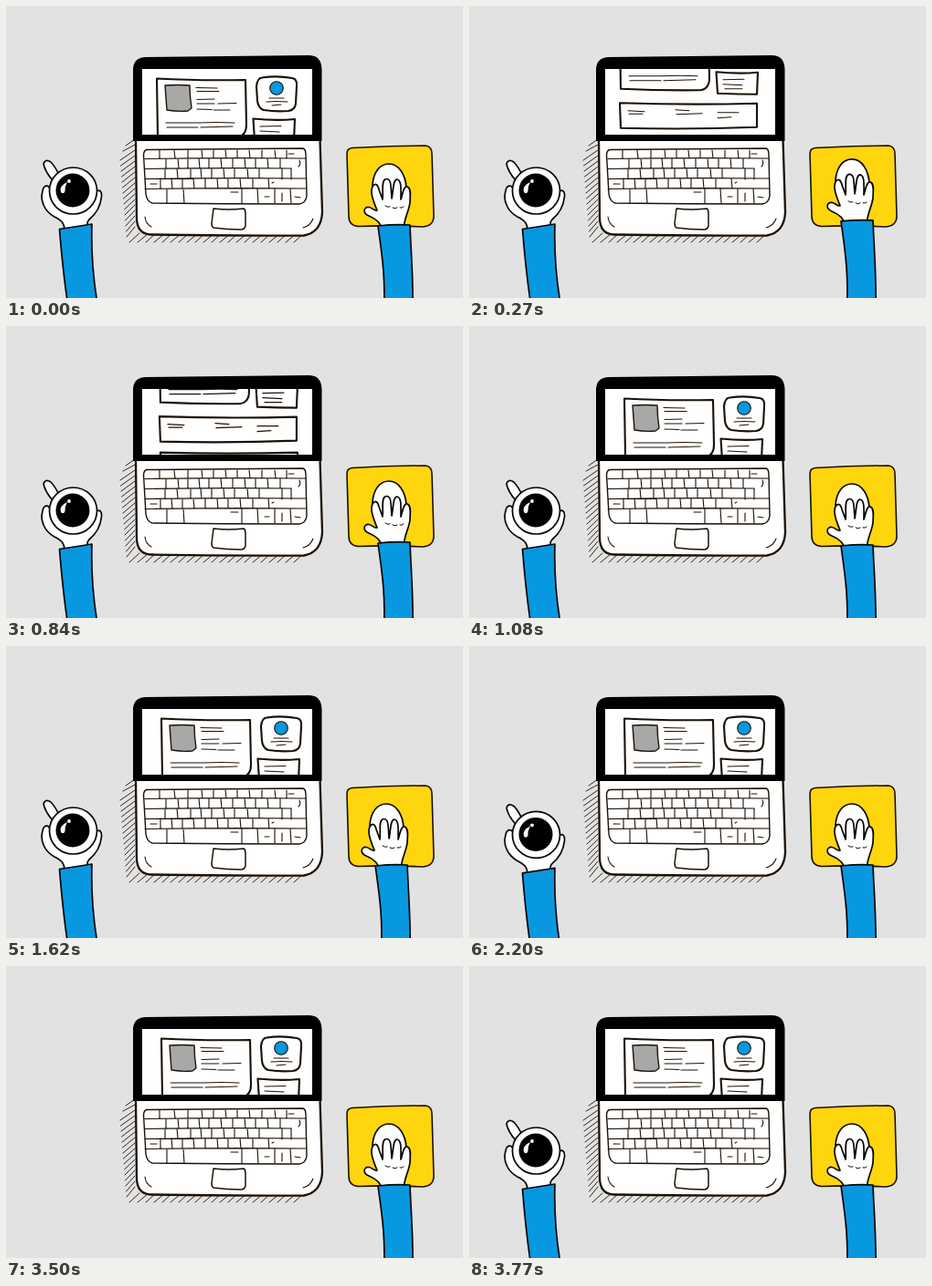
Recreate the animation shown at these times as an HTML page. Size 500 px wide and 320 px high, loop 4770 ms.

```html
<!DOCTYPE html>
<html lang="en">
<head>
<meta charset="utf-8">
<title>Desk</title>
<style>
  html, body { margin: 0; width: 100%; height: 100%; overflow: hidden; background: #e2e2e2; }
  svg { display: block; }
  .ink { fill: none; stroke: #1c1005; stroke-linecap: round; stroke-linejoin: round; }
  .arm { fill: #fff; stroke: #050505; stroke-width: 1.7; stroke-linecap: round; stroke-linejoin: round; }
  .blue { fill: #0898e0; }
  .gray { fill: #a8a8a8; }
  .white { fill: #fff; }
</style>
</head>
<body>
<svg width="500" height="320" viewBox="0 0 500 320">
  <clipPath id="view"><rect x="149" y="69" width="186" height="73"/></clipPath>

  <!-- laptop -->
  <path id="hatch" class="ink" stroke-width=".9"/>
  <path class="ink white" stroke-width="2.3" d="M142 146L143 232Q143 250 159 250.500Q240 252 326 251.500Q345 248 346 226L343.500 146Z"/>
  <path d="M139 148V70Q139 57 152 56L331 54Q345 54 345.500 69V148Z"/>
  <rect class="white" x="149" y="69" width="186" height="72"/>
  <g clip-path="url(#view)">
    <g id="page" class="ink" stroke-width="1.1">
      <g stroke-width="2.1">
        <path d="M165 79.500Q210 82 262 81L263 130Q263 143 252 143.500Q210 144 166 142Z"/>
        <path d="M280 78.500Q297 76 313 79Q319 80 318 88L317 107Q316 114 309 115Q295 116 282 114Q276 112 275 104L274 88Q275 79 280 78.500Z"/>
        <path d="M270.500 123.500Q295 126 316 124L315 148Q295 148 272 147Z"/>
        <path d="M165 157.500Q240 160 315 158V184Q240 187 166 185Z"/>
        <path d="M166 197Q240 199 316 197L317 240Q316 249 308 249Q240 247 174 248Q166 247 166 240Z"/>
        <path d="M167 258Q240 261 317 258.500L316 310H168ZM180 275.5Q245 274 316 275"/>
      </g>
      <path class="gray" stroke-width="1.4" d="M174 87Q188 86 201 87Q201 99 203 112L199 115Q188 116 176 114Z"/>
      <circle class="blue" cx="296" cy="90" r="7.3"/>
      <path d="M208 89.500L231 90M209 93.500H233M209 102.500L228 102M209 107H228M232 107L252 106.500M209 113L225 113.500M227 114H245
        M175 128H211Q230 127 250 128M176 133H210M213 133L248 132
        M288 101H304M285 105Q296 104 308 105M291 109L301 108
        M278 132L301 131.500M278 137L299 138M280 142H299
        M174 166L192 167M175 169.500H190M226 165L241 166M227 170L255 169M272 168H295M272 174L287 173"/>
      <path stroke-width="1.5" d="M183 206Q196 205 209 206Q212 207 212 213V225Q211 230 206 230Q195 231 185 229Q180 228 180 221L179 211Q180 206 183 206Z"/>
      <path class="gray" stroke-width="1.4" d="M258 206Q282 207 306 205L305 229Q282 230 260 229Z"/>
      <path d="M218 208H237M218 213L249 212M218 218H244M218 222L240 223M219 227H231M216 239L252 240M256 239H263M180 269Q200 268 216 270"/>
    </g>
  </g>
  <g class="ink" stroke-width="1.1">
    <path stroke-width="1.4" d="M154 157.500Q240 157 325 156Q328 157 328 163L329 208Q328 216 321 217Q240 217 160 216Q154 214 153 206L150.500 163Q151 158 154 157.500Z"/>
    <path id="keys"/>
    <path d="M302 178V190M312 178V190M246 204H254M283 209H288M302 205V214M316 209L322 210M309 162H315M158 195H165M321 169Q323 173 320 176M291 194L293 193"/>
    <path stroke-width="1.5" d="M227 222Q244 224 260 222Q262 223 262 227V241Q261 245 257 245Q241 245 227 243Q225 242 225 238Z"/>
    <path d="M152 231Q153 239 159 242M336 233Q333 241 325 243"/>
  </g>

  <!-- mouse pad -->
  <path fill="#ffd50d" stroke="#1c1005" stroke-width="1.6" d="M379 155.500Q420 153 459 153Q466 154 466 162L468 230Q468 241 456 242Q420 240 386 241.500Q375 241 375 230L373 162Q373 156 379 155.500Z"/>
  <g id="mouse" class="arm">
    <path d="M419 173C430 173 437 185 438 199Q438 216 420 216Q402 216 401 196C402 182 409 173 419 173Z"/>
    <path d="M411 244C410 237 404 233 397 230C390 227 391 220 397 220.500C401 221 403 225 406 224C402 214 398 204 401 198C404 193 407 196 408 201L412 212C413 204 410 190 416 189.500C422 189 421 199 422 211C424 203 423 190 428 190C433 191 432 201 432 212C434 206 435 197 439 198C444 200 442 209 442 215C441 225 436 231 435 244Z"/>
    <path fill="none" stroke-width="1" d="M415 219Q417 221 420 220M423 221Q426 223 428 221M431 221Q433 222 435 220"/>
    <path class="blue" d="M407 241Q425 239 442 240C443 270 446 300 445 340H413C416 300 411 270 407 241Z"/>
  </g>

  <!-- coffee -->
  <g id="coffee" class="arm">
    <path d="M64 246C64 238 61 235 53 231C42 225 37 213 40 203C41 196 47 195 48 201L98 204C102 200 105 203 104.500 209C103 222 96 230 91 234C88 237 89 240 90 245Z"/>
    <path d="M59 187Q54 176 49 171Q43 167 41 173Q43 182 51 191Z"/>
    <ellipse cx="73.500" cy="202.500" rx="26" ry="25.500"/>
    <circle fill="#000" stroke="none" cx="73" cy="202" r="18.500"/>
    <path stroke="none" d="M67 193Q58 197 60 204Q63 207 64.500 203Q64 198 67 193Z"/>
    <circle stroke="none" cx="69" cy="192" r="1.900"/>
    <path class="blue" d="M58.500 244.500L94 239C93 270 95 295 99.500 323H67C63 295 60.500 270 58.500 244.500Z"/>
  </g>
</svg>
<script>
const el = id => document.getElementById(id);
const range = (n, f) => Array.from({ length: n }, (_, i) => f(i)).join("");

el("hatch").setAttribute("d",
  range(17, i => `M141 ${146 + 6 * i}L${i < 2 ? 131 - 3 * i : 124 + i * .5} ${(i < 2 ? 153 : 157) + 6 * i}`) +
  range(21, i => `M${146 + 9 * i} ${249 + i % 2}L${135 + 9 * i} 259`));

// Each row: top, bottom, then the dividers between keys.
const rows = [
  [158, 167, 168, 184, 199, 214, 227, 240, 253, 266, 280, 294, 307],
  [167, 178, 175, 188, 199, 211, 222, 235, 248, 261, 273, 286, 300],
  [178, 189, 174, 187, 202, 213, 225, 238, 250, 264, 277],
  [189, 200, 169, 181, 193, 205, 218, 231, 243, 256, 270, 287],
  [200, 216, 176, 194, 258, 275, 294, 311]
];
el("keys").setAttribute("d", rows.map(([top, low, ...xs], i) =>
  (i ? `M152 ${top + .5}Q240 ${top - 1} ${i == 2 ? 312 : 328} ${top}` : "") +
  xs.map((x, k) => `M${x} ${top}L${x + k % 2} ${low}`).join("")).join(""));

const LOOP = 4770, STEP = 30;
const smooth = p => p * p * (3 - 2 * p);
const clamp = p => Math.max(0, Math.min(1, p));
const move = (id, x, y) => el(id).setAttribute("transform", `translate(${x} ${y})`);

function draw() {
  const t = performance.now() % LOOP;
  const part = (start, steps) => clamp(Math.floor((t - start) / STEP) / steps);

  const down = part(0, 18), back = smooth(part(540, 18));
  move("page", 5 * back, -140 * down ** 1.45 * (1 - back));

  // Sideways wiggle: left, right, centre.
  const w = 1380 + 420 * part(1380, 14);
  const ease = (a, b) => smooth(clamp((w - a) / (b - a)));
  const sway = -5 * ease(1380, 1575) + 8 * ease(1575, 1710) - 3 * ease(1710, 1800);
  move("mouse", sway, -7.2 * Math.sin(down * Math.PI / 2) * (1 - back));

  move("coffee", 0, 158 * (smooth(part(2170, 10)) - smooth(part(3470, 10))));
  requestAnimationFrame(draw);
}
draw();
</script>
</body>
</html>
```
